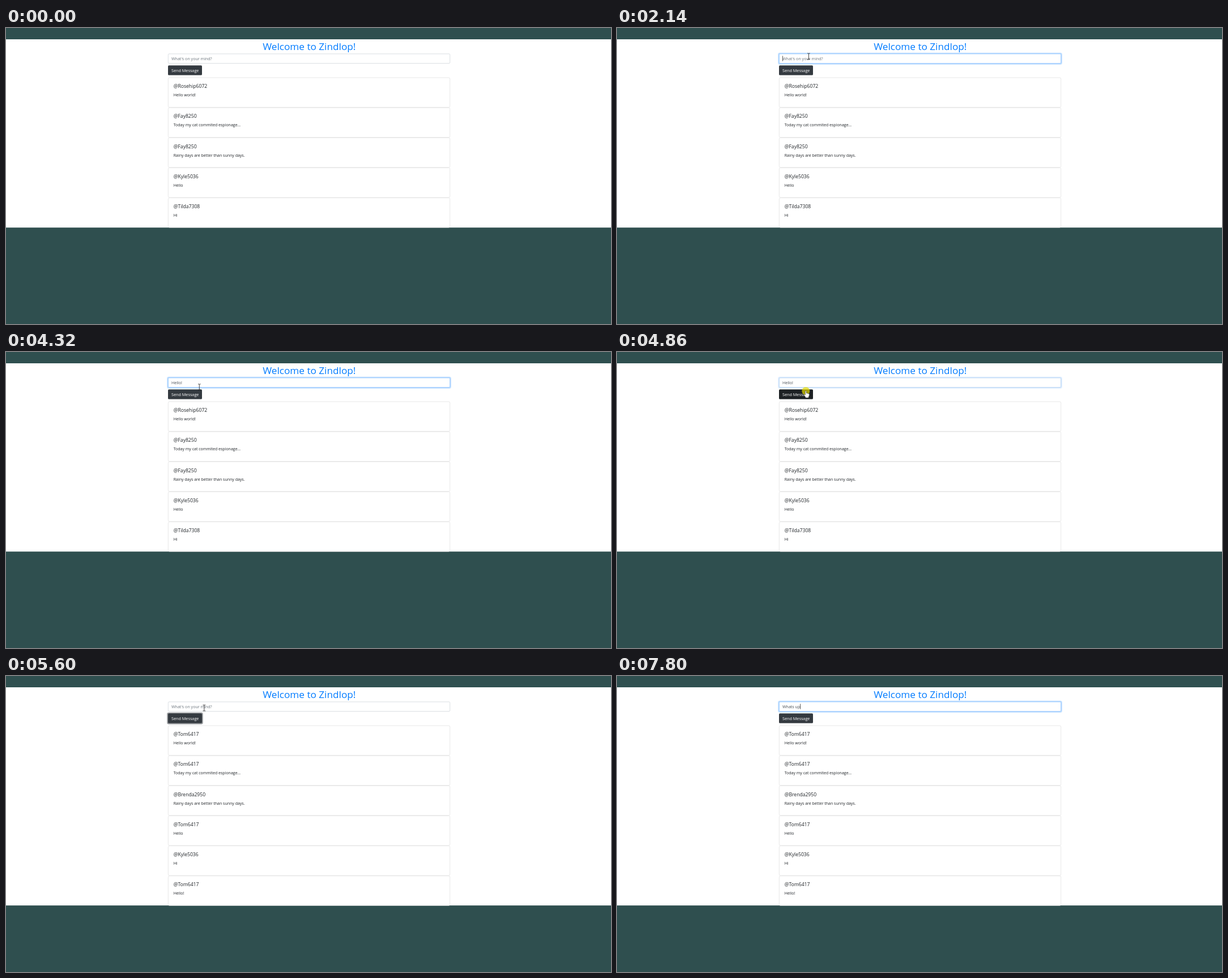
These frames come from a looping animation (1068 by 524 pixels, 8 s). An HTML page:

```html
<!DOCTYPE html>
<html lang="en">
<head>
<meta charset="utf-8">
<title>Message board</title>
<style>
  html, body { margin: 0; width: 100%; height: 100%; overflow: hidden; background: #2f4f4f; }
  svg { display: block; width: 1068px; height: 524px; }
  text { font-family: "Open Sans", "Noto Sans", sans-serif; white-space: pre; }
  .title { font-size: 17.2px; fill: #007bff; text-anchor: middle; }
  .user { font-size: 8.6px; fill: #212529; }
  .body { font-size: 7px; fill: #212529; }
  .field { font-size: 7.1px; }
  .label { font-size: 7.25px; fill: #fff; }
  .card { fill: #fff; stroke: #dcdcdc; stroke-width: .65; }
</style>
</head>
<body>
<svg viewBox="0 0 1068 524">
  <rect width="1068" height="524" fill="#2f4f4f"/>
  <rect id="page" y="20" width="1068" fill="#fff"/>
  <text class="title" x="535.3" y="38.6">Welcome to Zindlop!</text>

  <rect id="glow" x="284.2" y="43.7" width="501.6" height="21" rx="3.2" fill="#007bff"/>
  <rect id="input" x="286.3" y="45.8" width="497.4" height="16.8" rx="1.7" fill="#fff" stroke-width=".75"/>
  <text id="field" class="field" x="292" y="57.1"></text>
  <rect id="caret" y="49.3" width=".8" height="9.4" fill="#333"/>

  <rect id="ring" x="284.2" y="64.4" width="63.6" height="21" rx="3.2" fill="#343a40"/>
  <rect id="button" x="286" y="66.2" width="60" height="17.4" rx="1.7"/>
  <text class="label" x="292" y="77.8">Send Message</text>

  <g id="cards"></g>

  <g id="cursor">
    <circle id="press" r="7" fill="#e6dc00" opacity=".7"/>
    <path id="arrow" d="M0 0V9.4L2.2 7.4L3.7 10.8L5.1 10.2L3.7 6.9H6.7Z" fill="#fff" stroke="#000" stroke-width=".55"/>
    <path id="beam" d="M-2.3-5.3H-.6L0-4.8L.6-5.3H2.3M0-4.8V4.8M-2.3 5.3H-.6L0 4.8L.6 5.3H2.3" fill="none" stroke="#222" stroke-width=".85"/>
    <path id="hand" d="M-1 .4Q0-.7 1 .4V4Q2 3.4 2.8 4.3Q3.8 3.8 4.4 4.7Q5.6 4.4 5.9 5.6V8.4L4.9 10.6V12H-.6V10.8L-3 7.4Q-3.4 5.9-2 6.2L-1 7.2Z" fill="#fff" stroke="#222" stroke-width=".5"/>
  </g>
</svg>
<script>
const DURATION = 8000, BLINK = 530, CARD_TOP = 87.6, CARD_STEP = 53.2;
const $ = id => document.getElementById(id);
const set = (id, attrs) => Object.entries(attrs).forEach(([k, v]) => $(id).setAttribute(k, v));
const show = (id, on) => set(id, { visibility: on ? 'visible' : 'hidden' });

const messages = ['Hello world!', 'Today my cat commited espionage...',
  'Rainy days are better than sunny days.', 'Hello', 'Hi', 'Hello!'];
const usersBefore = ['@Rosehip6072', '@Fay8250', '@Fay8250', '@Kyle5036', '@Tilda7308'];
const usersAfter = ['@Tom6417', '@Tom6417', '@Brenda2950', '@Tom6417', '@Kyle5036', '@Tom6417'];

const FOCUS = [1070, 6080], SEND = 4790, POSTED = 4930;
const typing = [
  { text: 'Hello!', times: [2940, 3070, 3230, 3390, 3520, 3720], end: POSTED },
  { text: 'Whats up', times: [7060, 7150, 7230, 7300, 7400, 7600, 7700, 7800], end: DURATION }
];
const presses = [[1000, 1070], [SEND, POSTED], [6080, 6150]];

// Each visible stretch of the pointer: points are [time, x, y].
const trips = [
  { end: 2940, points: [[130, 935, 471], [340, 760, 330], [500, 520, 170], [650, 332, 72],
    [740, 324, 58], [870, 338.4, 50.2]] },
  { end: 7060, points: [[4040, 338.4, 50.2], [4200, 343, 57], [4390, 340, 66], [4520, 333.3, 69],
    [5060, 333.3, 69], [5400, 340, 67], [5470, 346, 62], [5600, 350.5, 55.6]] }
];

const within = (t, a, b) => t >= a && t < b;
const ease = (t, a, b) => {
  const p = Math.min(1, Math.max(0, (t - a) / (b - a)));
  return p * p * (3 - 2 * p);
};
const pulse = (t, on, off, span = 150) => ease(t, on, on + span) * (1 - ease(t, off, off + span));
const mix = (a, b, p) => `rgb(${a.map((v, i) => v + (b[i] - v) * p)})`;

function follow(points, t) {
  const next = points.findIndex(p => p[0] > t);
  if (next < 0) return points.at(-1).slice(1);
  const [a, b] = [points[next - 1], points[next]];
  const p = (t - a[0]) / (b[0] - a[0]);
  return [a[1] + (b[1] - a[1]) * p, a[2] + (b[2] - a[2]) * p];
}

$('cards').innerHTML = messages.map((message, i) => {
  const y = CARD_TOP + i * CARD_STEP;
  return `<g><rect class="card" x="286.3" y="${y + .3}" width="497.4" height="52.5" rx="2.2"/>
    <text class="user" x="295.7" y="${y + 18.5}"></text>
    <text class="body" x="295.7" y="${y + 33.6}">${message}</text></g>`;
}).join('');
const cards = [...$('cards').children];

function drawCards(t) {
  const users = t < POSTED ? usersBefore : usersAfter;
  set('page', { height: users.length === 5 ? 333.3 : 386.2 });
  cards.forEach((card, i) => {
    card.setAttribute('visibility', i < users.length ? 'visible' : 'hidden');
    card.querySelector('.user').textContent = users[i] || '';
  });
}

function drawInput(t) {
  const focus = pulse(t, 1060, SEND) + ease(t, 6120, 6270);
  set('glow', { opacity: .25 * focus });
  set('input', { stroke: mix([206, 212, 218], [128, 189, 255], focus) });

  const entry = typing.find(e => within(t, e.times[0], e.end));
  const count = entry ? entry.times.filter(time => time <= t).length : 0;
  const field = $('field');
  field.textContent = entry ? entry.text.slice(0, count) : 'What\'s on your mind?';
  field.setAttribute('fill', entry ? '#495057' : '#6c757d');

  const focused = within(t, FOCUS[0], SEND) || t >= FOCUS[1];
  const blinkStart = entry ? entry.times[count - 1] : FOCUS[t < SEND ? 0 : 1];
  show('caret', focused && Math.floor((t - blinkStart) / BLINK) % 2 === 0);
  set('caret', { x: 292 + (entry ? field.getComputedTextLength() : 0) });
}

function drawButton(t) {
  const hover = pulse(t, 4390, 5450);
  const pressed = within(t, SEND, 5000);
  set('button', { fill: pressed ? '#1d2124' : mix([52, 58, 64], [35, 39, 43], hover) });
  set('ring', { opacity: .5 * pulse(t, 4860, 6080, 130) });
}

function drawCursor(t) {
  const trip = trips.find(({ points, end }) => within(t, points[0][0], end));
  const [x, y] = trip ? follow(trip.points, t - (t - trip.points[0][0]) % 67) : [0, 0];
  const overInput = within(x, 286, 784) && within(y, 45, 63);
  const overButton = within(x, 286, 346) && within(y, 66, 84);
  set('cursor', { transform: `translate(${x} ${y})` });
  show('beam', trip && overInput);
  show('hand', trip && overButton);
  show('arrow', trip && !overInput && !overButton);
  show('press', presses.some(([a, b]) => within(t, a, b)));
}

function frame() {
  const t = performance.now() % DURATION;
  drawCards(t);
  drawInput(t);
  drawButton(t);
  drawCursor(t);
  requestAnimationFrame(frame);
}
frame();
</script>
</body>
</html>
```
